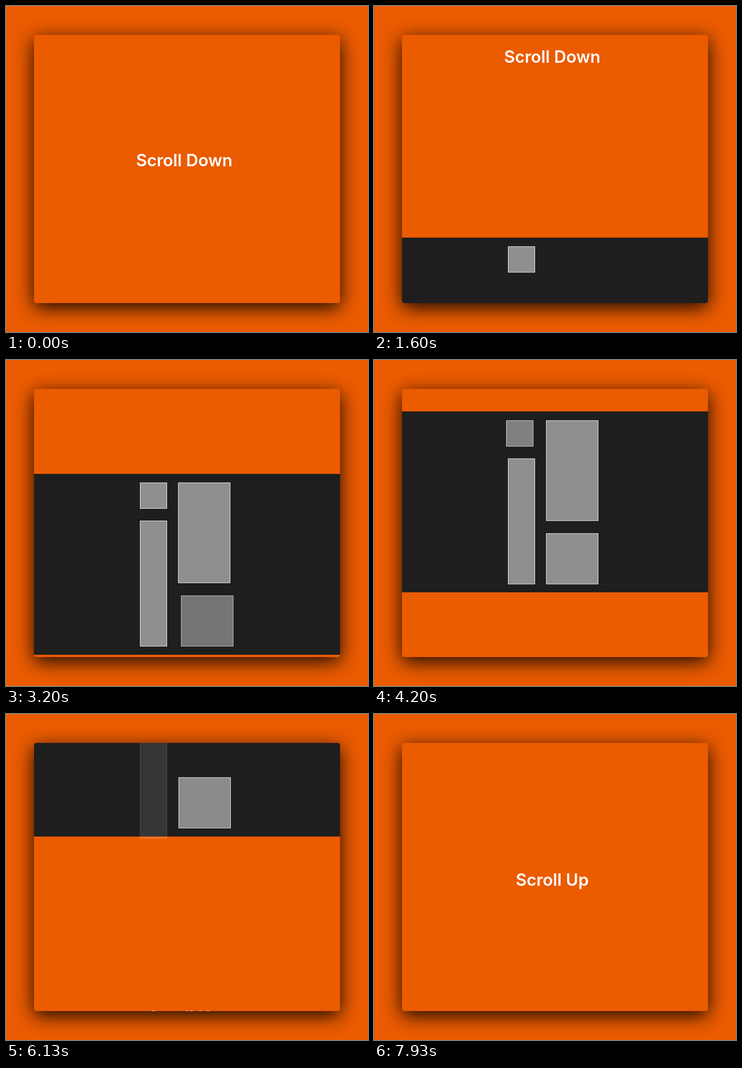
Recreate the animation shown at these times as an HTML page. Size 789 px wide and 710 px high, loop 7.99 s.

```html
<!DOCTYPE html>
<html lang="en">
<head>
<meta charset="utf-8">
<title>Scroll reveal</title>
<style>
  html, body { margin: 0; width: 100%; height: 100%; overflow: hidden; background: #eb5b00; }
  #card {
    position: absolute; left: 61px; top: 63px; width: 667px; height: 584px;
    overflow: hidden; border-radius: 5px; background: #eb5b00;
    box-shadow: 0 10px 42px rgba(0, 0, 0, .92);
  }
  /* The page uses stage coordinates */
  #page { position: absolute; left: -61px; top: -63px; width: 789px; will-change: transform; }
  h1 {
    position: absolute; left: 0; width: 777px; height: 44px; margin: -22px 0 0;
    font: 600 36.5px/44px Inter, "Open Sans", sans-serif;
    color: #fff; text-align: center; white-space: nowrap;
  }
  #dark { position: absolute; left: 0; top: 730px; width: 789px; height: 393.5px; background: #1e1e1e; }
  .tile {
    position: absolute; box-sizing: border-box;
    border: 1.3px solid #fff; background: rgba(255, 255, 255, .5);
  }
</style>
</head>
<body>
<div id="card">
  <div id="page">
    <h1 style="top: 335.5px">Scroll Down</h1>
    <div id="dark"></div>
    <h1 style="top: 1517px">Scroll Up</h1>
  </div>
</div>
<script>
  const LOOP = 7990;
  const DARK_TOP = 730;
  const VIEW_BOTTOM = 736, VIEW_HEIGHT = 788;
  const SHIFT = 29;

  // [time in ms, scroll in px]
  const scrollSteps = [
    [0, 0], [930, 124], [2330, 336], [3200, 482], [4200, 617.5],
    [6130, 857], [6400, 894], [7200, 1020], [7930, 1156], [7990, 1156]
  ];

  // Each tile slides out towards (dx, dy)
  const tiles = [
    { x: 291.5, y: 18.5, w: 59, h: 57, dx: -1, dy: 0 },
    { x: 375.3, y: 18.5, w: 113.5, h: 219.5, dx: 0, dy: -1 },
    { x: 291.5, y: 101.5, w: 59, h: 274, dx: 0, dy: 1 },
    { x: 375.3, y: 264.5, w: 113.5, h: 111, dx: 1, dy: 0 }
  ];

  const page = document.getElementById("page");
  const dark = document.getElementById("dark");

  for (const tile of tiles) {
    tile.el = document.createElement("div");
    tile.el.className = "tile";
    tile.el.style.cssText =
      `left:${tile.x}px;top:${tile.y}px;width:${tile.w}px;height:${tile.h}px`;
    dark.append(tile.el);
  }

  const ramp = (v, from, to) => Math.min(1, Math.max(0, (v - from) / (to - from)));

  function scrollAt(time) {
    const i = scrollSteps.findIndex(step => step[0] > time);
    const [t0, s0] = scrollSteps[i - 1], [t1, s1] = scrollSteps[i];
    return s0 + (s1 - s0) * ramp(time, t0, t1);
  }

  function draw(time) {
    const scroll = scrollAt(time);
    page.style.transform = `translateY(${-scroll}px)`;
    for (const { el, y, h, dx, dy } of tiles) {
      // Progress of the tile while it is fully inside the viewport
      const bottom = DARK_TOP + y + h - scroll;
      const progress = (VIEW_BOTTOM - bottom) / (VIEW_HEIGHT - h);
      const shown = Math.min(ramp(progress, .11, .183), 1 - ramp(progress, .71, 1.015));
      const d = SHIFT * (1 - shown);
      el.style.opacity = shown;
      el.style.transform = `translate(${dx * d}px, ${dy * d}px)`;
    }
  }

  const start = performance.now();
  function tick() {
    draw((performance.now() - start) % LOOP);
    requestAnimationFrame(tick);
  }
  tick();
</script>
</body>
</html>
```
